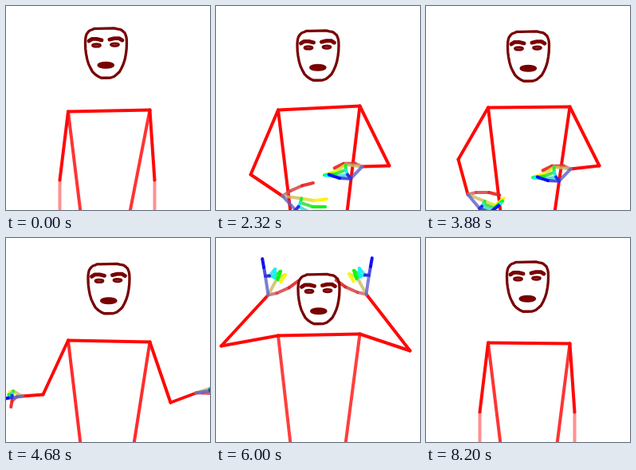
An HTML page with a canvas that plays this animation: 256 px wide and 256 px high, repeating every 8.24 s.

```html
<!DOCTYPE html>
<html lang="en">
<head>
<meta charset="utf-8">
<title>Signing figure</title>
<style>
html, body { margin: 0; width: 100%; height: 100%; overflow: hidden; background: #fff; }
canvas { display: block; width: 100vw; height: 100vh; }
</style>
</head>
<body>
<canvas id="stage" width="256" height="256"></canvas>
<script>
const ctx = document.getElementById('stage').getContext('2d');
const LOOP = 8240, STEP = 40;
const RED = '255, 8, 8', DARK = '#780000';

// Angles in degrees for the left hand; the right hand is mirrored.
// spread: knuckle arc, fan: finger arc, curl: bend per joint.
const flat = { turn: 27, spread: 40, fan: 24, palm: 24, bone: 16, curl: -18, pinky: -18, thumb: -34, hook: 10 };
const fold = { turn: 36, spread: 28, fan: 0, palm: 23, bone: 14, curl: -60, pinky: -60, thumb: -14, hook: 14 };
const cup = { turn: 20, spread: 53, fan: -37, palm: 21, bone: 14, curl: -16, pinky: -16, thumb: -24, hook: 25 };
const fist = { turn: -170, spread: -38, fan: -20, palm: 13, bone: 5, curl: -150, pinky: -10, thumb: -180, hook: -40 };
const point = { turn: -166, spread: -8, fan: 0, palm: 18, bone: 9, curl: 3, pinky: 3, thumb: -180, hook: -3 };
const horn = { turn: -80, spread: -37, fan: -40, palm: 24, bone: 11, curl: 145, pinky: 0, thumb: -12, hook: -12 };

// head: x and top; neck: shoulder heights; arms: elbow then wrist; hip: right hip x.
const rest = {
  head: [125, 27.5], neck: [132, 130], hip: 155, torso: .82, fore: .45,
  left: [67, 218, 67, 290], right: [186, 218, 186, 290], handL: flat, handR: cup
};
const sign = {
  head: [127.5, 30.5], neck: [130, 125], hip: 164, torso: 1, fore: 1,
  left: [43, 211, 83, 238], right: [217, 200, 183, 201], handL: flat, handR: cup
};
const wide = { ...sign, left: [36, 201, 66, 238] };
const stroke = {
  ...sign, head: [128, 31.5], neck: [127, 126], hip: 161,
  left: [40, 192, 52, 236], right: [217, 200, 181, 204], handL: fold
};
const open = {
  head: [128.5, 32], neck: [128, 130], hip: 160, torso: .85, fore: 1,
  left: [46, 196, 20, 198], right: [206, 206, 238, 194], handL: fist, handR: point
};
const nod = {
  head: [128.5, 45], neck: [122, 120], hip: 162, torso: .78, fore: 1,
  left: [6, 135, 65, 71], right: [243, 141, 188, 70], handL: horn, handR: horn
};
const raise = { ...nod, head: [128.5, 33] };
const drop = {
  ...rest, head: [127, 28], neck: [131, 131], hip: 163, fore: .9,
  left: [49, 208, 56, 285], right: [202, 210, 213, 285]
};
const end = { ...rest, head: [127, 29.5], neck: [131, 132], hip: 164 };

const moves = [
  [0, rest], [880, rest], [1440, sign], [2320, sign], [2960, wide],
  [3640, stroke], [4240, stroke], [4640, open], [4720, open], [5120, raise],
  [5400, raise], [6000, nod], [6320, nod], [6800, drop], [7320, end], [LOOP, end]
];

const ease = k => k * k * (3 - 2 * k);

// Blends numbers, and any nesting of lists and objects of numbers.
function mix(a, b, k) {
  if (typeof a === 'number') return a + (b - a) * k;
  if (Array.isArray(a)) return a.map((v, i) => mix(v, b[i], k));
  return Object.fromEntries(Object.keys(a).map(n => [n, mix(a[n], b[n], k)]));
}

function poseAt(t) {
  const i = moves.findIndex(([end]) => end > t);
  const [t0, a] = moves[i - 1], [t1, b] = moves[i];
  return mix(a, b, ease((t - t0) / (t1 - t0)));
}

function path(pts, color, width = 4, close = false) {
  ctx.beginPath();
  pts.forEach(([x, y]) => ctx.lineTo(x, y));
  if (close) ctx.closePath();
  ctx.strokeStyle = color;
  ctx.lineWidth = width;
  ctx.stroke();
}

function oval(x, y, rx, ry, fill) {
  ctx.beginPath();
  ctx.ellipse(x, y, rx, ry, 0, 0, Math.PI * 2);
  ctx.fillStyle = fill;
  ctx.fill();
  ctx.strokeStyle = DARK;
  ctx.lineWidth = 2.4;
  ctx.stroke();
}

function hand(x, y, h, side) {
  const move = ([px, py], deg, len) => {
    const a = deg * Math.PI / 180;
    return [px + side * len * Math.cos(a), py + len * Math.sin(a)];
  };
  // Colour gets stronger from the palm to the fingertips.
  const tint = (i, k) => `hsla(${i * 60}, ${50 + k * 22}%, ${58 - k * 4}%, ${.8 + k * .08})`;
  const wrist = [x, y];

  const thumb = [wrist];
  [.46, .7, .6].forEach((len, k) => {
    thumb.push(move(thumb[k], h.thumb + h.hook * k, len * h.palm));
    path(thumb.slice(k), tint(0, k * .7));
  });

  const knuckles = [0, 1, 2, 3].map(i => move(wrist, h.turn + h.spread * (i / 3 - .5), h.palm));
  path([wrist, knuckles[0]], tint(.85, 0));
  path([wrist, knuckles[3]], tint(4, 0));
  knuckles.forEach((knuckle, i) => {
    if (i) path([knuckles[i - 1], knuckle], tint(i + 1, 1.5));
    let tip = knuckle;
    for (const k of [1, 2]) {
      const bend = (i === 3 ? h.pinky : h.curl) * (k - .75);
      const next = move(tip, h.turn + h.fan * (i / 3 - .5) + bend, h.bone);
      path([tip, next], tint(i + 1, k));
      tip = next;
    }
  });
}

function face([cx, top]) {
  const rim = [];
  for (let i = 0; i < 40; i++) {
    const a = i / 40 * Math.PI * 2, c = Math.cos(a), s = Math.sin(a);
    const u = Math.sign(c) * Math.abs(c) ** (s < 0 ? .5 : .8);
    const v = s < 0 ? .3 - .3 * (-s) ** .7 : .3 + .7 * s;
    rim.push([cx + 26 * u, top + 62.5 * v + .3 * Math.sin(i * 2.4)]);
  }
  path(rim, DARK, 3.3, true);

  const eye = top + 21;
  for (const side of [-1, 1]) {
    const at = (x, y) => [cx - .5 + side * x, eye + y - side * .4];
    path([at(5, -6.5), at(11, -8), at(17, -8), at(21, -5.5)], DARK, 4.8);
    oval(...at(11.5, 0), 5.2, 1.9, '#944');
  }
  oval(cx - .2, top + 46.3, 9.6, 3.3, DARK);
}

function draw(t) {
  const p = poseAt(t);
  const arms = [[77.5, p.neck[0], 93, p.left], [180, p.neck[1], p.hip, p.right]];

  ctx.setTransform(1, 0, 0, 1, 0, 0);
  ctx.fillStyle = '#fff';
  ctx.fillRect(0, 0, 256, 256);
  ctx.translate(.5, .5);
  ctx.lineCap = ctx.lineJoin = 'round';

  for (const [x, y, hip] of arms) path([[x, y], [hip, 258]], `rgba(${RED}, ${p.torso})`);
  path(arms, `rgb(${RED})`);
  for (const [x, y, , [ex, ey, wx, wy]] of arms) {
    path([[ex, ey], [wx, wy]], `rgba(${RED}, ${p.fore})`);
    path([[x, y], [ex, ey]], `rgb(${RED})`);
  }
  hand(p.left[2], p.left[3], p.handL, 1);
  hand(p.right[2], p.right[3], p.handR, -1);
  face(p.head);
}

const begin = performance.now();
function tick() {
  const t = (performance.now() - begin) % LOOP;
  draw(Math.floor(t / STEP) * STEP);
  requestAnimationFrame(tick);
}
tick();
</script>
</body>
</html>
```
